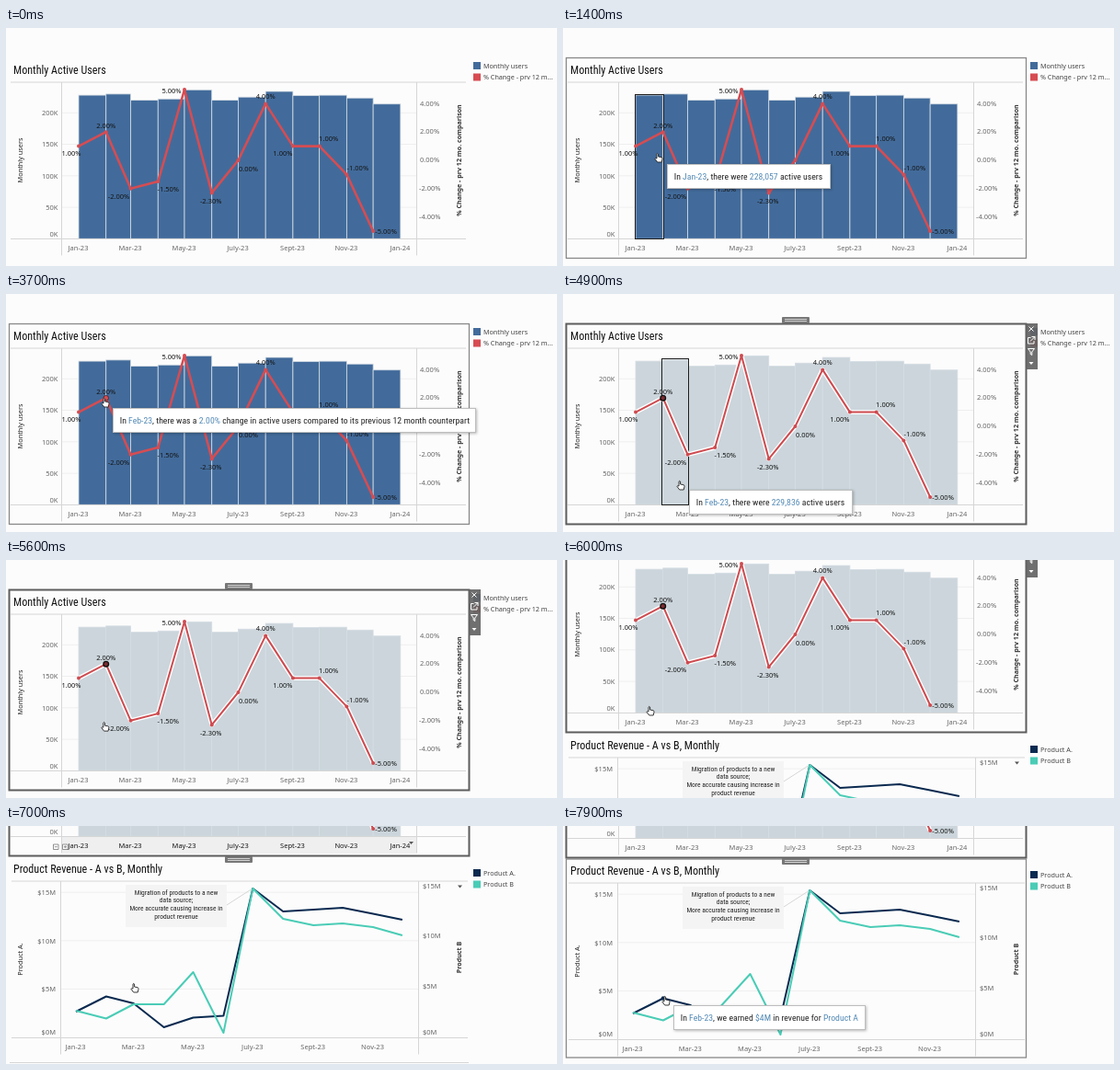
An HTML page that plays this animation: 599 by 259 pixels, repeating every 8000 ms.

```html
<!DOCTYPE html>
<html lang="en">
<head>
<meta charset="utf-8">
<title>Dashboard walkthrough</title>
<style>
html, body { margin: 0; width: 100%; height: 100%; overflow: hidden; background: #fcfcfc; }
svg { display: block; width: 599px; height: 259px; }
text { font-family: "Noto Sans", "Open Sans", sans-serif; font-size: 7.5px; fill: #666; }
.mark { fill: #151515; }
.legend { font-size: 7.2px; fill: #444; }
.axis { font-size: 7.3px; font-weight: 500; fill: #222; }
.axis.strong { font-size: 7.1px; font-weight: 600; fill: #333; }
.title, .tip text, .note { font-family: "Roboto Condensed", Roboto, sans-serif; font-stretch: condensed; fill: #222; }
.title { font-size: 12.1px; fill: #111; }
.tip text { font-size: 9.75px; }
.tip tspan { fill: #5289b5; }
.tip rect { fill: #fff; stroke: #bdbdbd; filter: drop-shadow(1px 1px 1.5px #0004); }
.note { font-size: 7.5px; }
.rule { stroke: #d6d6d6; fill: none; }
.grid { stroke: #efefef; fill: none; }
</style>
</head>
<body>
<svg id="stage" viewBox="0 0 599 259"></svg>
<script>
const LOOP = 8000;
const PICKED = 3900;
const stage = document.getElementById("stage");
const DAYS = [0, 31, 59, 90, 120, 151, 181, 212, 243, 273, 304, 334, 365];
const MONTHS = ["Jan-23", "Mar-23", "May-23", "July-23", "Sept-23", "Nov-23", "Jan-24"];

const line = (x1, y1, x2, y2, cls = "rule") => `<path class="${cls}" d="M${x1} ${y1}L${x2} ${y2}"/>`;
const rect = (x, y, w, h, attrs) => `<rect x="${x}" y="${y}" width="${w}" height="${h}" ${attrs}/>`;
const text = (x, y, s, cls = "", anchor = "middle", size = 7.5) =>
  `<text x="${x}" y="${y + size * 0.36}" class="${cls}" text-anchor="${anchor}">${s}</text>`;
const upright = (x, y, s, cls = "axis") => `<g transform="translate(${x} ${y}) rotate(-90)">${text(0, 0, s, cls)}</g>`;
const legend = (y, s, color) => rect(508, y - 4, 8, 8, `fill="${color}"`) + text(519, y, s, "legend", "start");
const group = (id, body, attrs = "") => `<g id="${id}" ${attrs}>${body}</g>`;
const poly = (pts, attrs) => `<polyline points="${pts.join(" ")}" fill="none" stroke-linejoin="round" ${attrs}/>`;
const dots = (pts, r, attrs = "") => pts.map(([x, y]) => `<circle cx="${x}" cy="${y}" r="${r}" ${attrs}/>`).join("");
const frame = (x, right, top, bottom, end, left) =>
  line(left, top, end, top) + line(left, bottom, end, bottom) +
  line(x, top, x, bottom + 18) + line(right, top, right, bottom + 18);
const tip = (id, x, y, w, s) =>
  group(id, rect(x + .5, y + .5, w, 26, "") + text(x + 7.7, y + 13.3, s, "", "start", 9.75), 'class="tip"');

function usersChart() {
  const dayX = d => 79 + d * 0.9585;
  const userY = k => 229.3 - k * 0.685;
  const pctY = p => 144 - p * 15.4;
  const users = [228.057, 229.836, 220, 222, 236.5, 220, 225, 234, 227.5, 228, 223.5, 214];
  const change = [1, 2, -2, -1.5, 5, -2.3, 0, 4, 1, 1, -1, -5];
  const shift = [[-8, 8], [0, -7], [-13, 8], [11, 8], [-14, 1], [-1, 9], [11, 9], [0, -8], [-11, 8], [10, -8], [12, -7], [14, 0]];
  const pts = change.map((p, i) => [dayX(DAYS[i]), pctY(p)]);
  const bar = i => rect(dayX(DAYS[i]), userY(users[i]), dayX(DAYS[i + 1]) - dayX(DAYS[i]), 229.3 - userY(users[i]),
    'stroke="#d5dde4" stroke-width=".8"');
  const outline = i => {
    const x = Math.floor(dayX(DAYS[i])) - .5, y = Math.floor(userY(users[i])) - .5;
    return rect(x, y, Math.ceil(dayX(DAYS[i + 1])) + .5 - x, 229.5 - y, 'fill="none" stroke="#1c1c1c"');
  };
  const months = cls => MONTHS.map((m, i) => text(dayX(DAYS[i * 2]) - .5, 239, m, cls)).join("");
  let s = text(8, 46, "Monthly Active Users", "title", "start", 12);
  for (const k of [50, 100, 150, 200]) s += line(60, userY(k), 446, userY(k), "grid");
  s += group("bars", users.map((u, i) => bar(i)).join(""));
  s += frame(60.5, 446.5, 59, 229.5, 500, 5);
  for (const k of [0, 50, 100, 150, 200]) s += text(56.5, k ? userY(k) : 224, k + "K", "", "end");
  for (const p of [4, 2, 0, -2, -4]) s += text(p < 0 ? 449 : 450, pctY(p) - .5, p.toFixed(2) + "%", "", "start");
  s += months("");
  s += group("axisHover", rect(61, 230, 385, 18, 'fill="#efefef"') + months("mark"));
  s += upright(15.5, 144, "Monthly users") + upright(492, 144, "% Change - prv 12 mo. comparison", "axis strong");
  s += group("barHover", outline(0)) + group("barHover2", outline(1));
  s += group("halo", poly(pts, 'stroke="#fff" stroke-width="4.8"'));
  s += group("trend", poly(pts, "") + dots(pts, 2, 'stroke="none"'));
  s += group("pointHover", dots([pts[1]], 2.8), 'fill="#d64c52" stroke="#4a2020" stroke-width=".8"');
  s += group("pointPicked", dots([pts[1]], 2.8), 'fill="#7c2c31" stroke="#111" stroke-width="1.4"');
  change.forEach((p, i) => s += text(pts[i][0] + shift[i][0], pts[i][1] + shift[i][1], p.toFixed(2) + "%", "mark"));
  return s + legend(41, "Monthly users", "#426b9b") + legend(53.5, "% Change - prv 12 m...", "#d64c52");
}

function revenueChart() {
  const dayX = d => 76 + d * 1.0625;
  const series = ys => ys.map((y, i) => [dayX(DAYS[i]), y]);
  const a = series([420, 403.5, 411, 437, 426.5, 424.5, 286, 311, 309, 307, 313.5, 320]);
  const b = series([419, 427.5, 412, 412, 377, 443, 286, 319, 326, 324, 328, 337]);
  const note = ["Migration of products to a new", "data source;", "More accurate causing increase in", "product revenue"];
  let s = text(8, 264.6, "Product Revenue - A vs B, Monthly", "title", "start", 12);
  for (const i of [1, 2, 3]) s += line(60, 448 - i * 52.6, 448, 448 - i * 52.6, "grid");
  s += frame(59.5, 448.5, 278, 448.5, 502, 6);
  [442, 395, 343, 290].forEach((y, i) => s += text(54, y, `$${i * 5}M`, "", "end"));
  [442, 392, 337, 283].forEach((y, i) => s += text(453, y, `$${i * 5}M`, "", "start"));
  MONTHS.slice(0, 6).forEach((m, i) => s += text(dayX(DAYS[i * 2]) - .5, 458, m));
  s += upright(15.5, 363, "Product A.") + upright(492, 361, "Product B", "axis strong");
  s += rect(130, 282, 110, 46, 'fill="#f4f4f4"') + line(240, 304, 268, 286);
  note.forEach((t, i) => s += text(185, 290 + i * 8.7, t, "note"));
  s += poly(a, 'stroke="#0a2a50" stroke-width="2"') + poly(b, 'stroke="#4accb6" stroke-width="2"');
  s += group("revenueDot", dots([a[1]], 2.2), 'fill="#0a2a50"');
  s += group("sortMark", '<path d="M491 282.5h5l-2.5 3z" fill="#555"/>');
  s += line(4, 475.5, 503, 475.5);
  return s + legend(269, "Product A.", "#0a2a50") + legend(281.5, "Product B", "#4accb6");
}

const grip = y => rect(238, y, 30, 7, 'rx="1" fill="#777"') +
  `<path d="M241 ${y + 2.5}h24M241 ${y + 4.5}h24" stroke="#ddd" stroke-width=".9"/>`;
const toolbar = rect(503, 32, 13, 50, 'fill="#636363" opacity=".92"') +
  `<g fill="none" stroke="#fff"><path d="M506.5 35.5l5 5m0-5l-5 5"/>
  <path d="M508.5 47.5h-3v6.5h6.5v-3M508 51.5l5-5m-3.5 0h3.5v3.5"/>
  <path d="M505.5 59.5h7l-2.7 3.5v3.5l-1.6-1v-2.5z"/></g><path d="M506.5 74h5l-2.5 3z" fill="#fff"/>`;
const axisTools = `<g fill="#fff" stroke="#777" stroke-width=".8"><path d="M51.5 238h5.5v5.5h-5.5zM61.5 238h5.5v5.5h-5.5z"/>
  <path d="M52.8 240.7h3M62.8 240.7h3M64.3 239.2v3"/></g><path d="M438 235h5l-2.5 3z" fill="#555"/>`;
const hand = `<path fill="#fff" stroke="#222" stroke-width=".9" stroke-linejoin="round"
  d="M-2 1V-4Q-1.2-5.3-.4-4V-1L3-.3Q4.2 0 4 1.5L3.2 5H-1.3L-4 1.5Q-4 .2-2 1Z"/>`;
const card = (y, h, color, width) => rect(3.5, y, 500, h, `fill="none" stroke="${color}" stroke-width="${width}"`);

stage.innerHTML = group("page",
  usersChart() + revenueChart() +
  group("cardHover", card(32.5, 218, "#888", 1.3)) +
  group("cardPicked", card(32.5, 218, "#5c5c5c", 2) + toolbar) +
  group("revenueHover", card(252, 216, "#888", 1.3)) +
  group("gripTop", grip(25)) + group("gripBottom", grip(251)) + group("axisTools", axisTools)) +
  tip("tipJan", 113, 148, 177, "In <tspan>Jan-23</tspan>, there were <tspan>228,057</tspan> active users") +
  tip("tipChange", 116, 124, 394, "In <tspan>Feb-23</tspan>, there was a <tspan>2.00%</tspan> change in active users compared to its previous 12 month counterpart") +
  tip("tipFeb", 137, 213, 177, "In <tspan>Feb-23</tspan>, there were <tspan>229,836</tspan> active users") +
  tip("tipRevenue", 120, 195, 208, "In <tspan>Feb-23</tspan>, we earned <tspan>$4M</tspan> in revenue for <tspan>Product A</tspan>") +
  group("cursor", hand);

const el = {};
stage.querySelectorAll("[id]").forEach(n => el[n.id] = n);

// Visible span in ms of each part that appears and disappears.
const SHOWN = {
  cardHover: [400, PICKED], cardPicked: [PICKED, LOOP], halo: [PICKED, LOOP], pointPicked: [PICKED, LOOP],
  barHover: [900, 2100], tipJan: [900, 2100],
  pointHover: [2200, PICKED], tipChange: [2200, 4100],
  barHover2: [4600, 5500], tipFeb: [4600, 5500],
  gripTop: [PICKED, 6200], gripBottom: [6300, LOOP],
  axisTools: [6300, 7300], axisHover: [6300, 7300], sortMark: [0, 7300],
  revenueHover: [7300, LOOP], revenueDot: [7500, LOOP], tipRevenue: [7500, LOOP],
  cursor: [400, LOOP]
};
const SCROLL = [[5650, 0], [6000, 63], [6700, 218], [7200, 218], [7400, 216]];
const CURSOR = [[400, 66, 150], [900, 104, 141], [1900, 104, 141], [2250, 108, 118], [3950, 108, 118],
  [4600, 128, 208], [5400, 128, 208], [5750, 95, 164], [6200, 95, 164], [6700, 140, 176], [7150, 140, 176], [7500, 112, 190]];

function at(keys, t) {
  const i = keys.findIndex(k => k[0] > t);
  if (i === 0) return keys[0].slice(1);
  if (i < 0) return keys[keys.length - 1].slice(1);
  const [a, b] = [keys[i - 1], keys[i]];
  const u = (t - a[0]) / (b[0] - a[0]);
  const e = u * u * (3 - 2 * u);
  return a.slice(1).map((v, j) => v + (b[j + 1] - v) * e);
}

function draw(t) {
  for (const id in SHOWN) {
    const [from, to] = SHOWN[id];
    el[id].style.display = t >= from && t < to ? "" : "none";
  }
  const picked = t >= PICKED;
  const red = picked ? "#cd4b50" : "#d64c52";
  el.bars.setAttribute("fill", picked ? "#cbd5db" : "#426b9b");
  el.trend.setAttribute("fill", red);
  el.trend.setAttribute("stroke", red);
  el.trend.setAttribute("stroke-width", picked ? 2 : 2.6);
  el.page.setAttribute("transform", `translate(0 ${-at(SCROLL, t)[0]})`);
  el.cursor.setAttribute("transform", `translate(${at(CURSOR, t)})`);
}

const start = performance.now();
function tick() {
  draw((performance.now() - start) % LOOP);
  requestAnimationFrame(tick);
}
draw(0);
requestAnimationFrame(tick);
</script>
</body>
</html>
```
